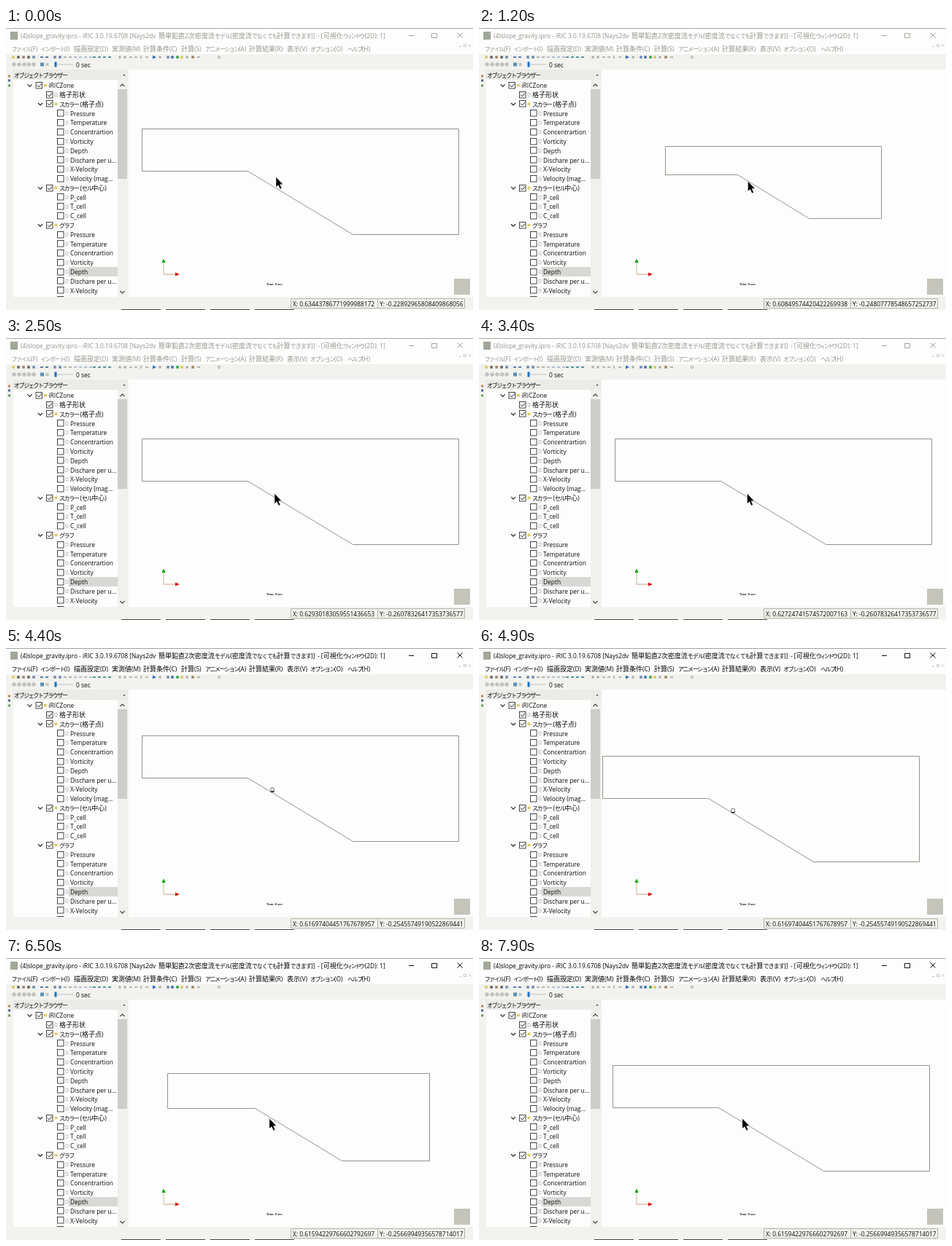
Write an HTML page that moves like this. It is 640 px wide and 387 px high and loops after 8000 ms.

```html
<!DOCTYPE html>
<html lang="ja">
<head>
<meta charset="utf-8">
<title>Slope model viewer</title>
<style>
html, body { margin: 0; width: 100%; height: 100%; overflow: hidden; background: #f2f2ee; }
svg { display: block; width: 100vw; height: 100vh; }
text { font: 8.4px 'Open Sans', 'Noto Sans CJK JP', 'Noto Sans CJK', sans-serif; fill: #0c0c0c; white-space: pre; }
.kanji { font-size: 9px; }
.kana { font-size: 8px; }
.bar text { fill: #95958c; }
.bar path { stroke: #a4a49c; fill: none; }
.active .bar text { fill: #000; }
.active .bar .window { stroke: #111; }
#time { font: bold 4px 'Liberation Sans', sans-serif; }
</style>
</head>
<body>
<svg id="stage" viewBox="0 0 640 387" preserveAspectRatio="none">
  <defs>
    <clipPath id="viewClip"><rect x="168" y="57" width="472" height="312"/></clipPath>
    <clipPath id="treeClip"><rect x="9" y="71" width="144" height="298"/></clipPath>
  </defs>
  <rect width="640" height="387" fill="#f2f2ee"/>
  <rect width="640" height="36" fill="#fdfdfd"/>
  <rect width="640" height="1" fill="#a4a49c"/>
  <path d="M158 386.500H395" stroke="#44443c" stroke-dasharray="54 7"/>
  <g id="bar" class="bar">
    <path class="window" d="M552 10.500h7M583.500 7.500h7v6h-7zM618.500 6.500l7 7M625.500 6.500l-7 7"/>
    <path d="M621 25.500h3M627.500 22.500h3v3h-3zM634 22.500l3 3M637 22.500l-3 3" stroke-width=".6"/>
  </g>
  <rect x="6" y="5" width="10" height="11" fill="#a0a898"/>
  <g id="tools"></g>

  <rect x="9" y="57" width="158" height="14" fill="#ebebe7"/>
  <path d="M160.500 64h3l-1.500 2z" fill="#333"/>
  <rect x="10" y="71" width="143" height="298" fill="#fdfdfd"/>
  <g id="tree" clip-path="url(#treeClip)"></g>
  <rect x="153" y="71" width="13" height="298" fill="#f0f0ec"/>
  <rect x="153" y="84" width="13" height="123" fill="#cdcdca"/>
  <path d="M156.500 80l3-3 3 3M156.500 361l3 3 3-3" stroke="#444" fill="none" stroke-width="1.200"/>

  <rect x="168" y="57" width="472" height="312" fill="#fdfdfd"/>
  <g clip-path="url(#viewClip)">
    <polygon id="outline" fill="none" stroke="#94948a"/>
  </g>
  <path d="M216 338V322" stroke="#b4c088"/>
  <path d="M216 338H232" stroke="#d09a80"/>
  <path d="M216 316.500l2.700 5.500h-5.400z" fill="#10a810"/>
  <path d="M238 338l-6-2.600v5.200z" fill="#d01010"/>
  <text id="time" x="357" y="353">Time: 0 sec</text>
  <rect x="614" y="344" width="22" height="22" fill="#c4c4ba"/>

  <path d="M390.500 371.500H628.500V384.500H390.500zM509.500 371.500v13" stroke="#b4b4ac" fill="none"/>
  <text id="xPos" x="393" y="381.500"></text>
  <text id="yPos" x="512" y="381.500"></text>

  <path id="arrow" d="M0 0V13.800L3.200 11.200 5.600 16.500 7.900 15.500 5.500 10.300 9.600 10z" fill="#000" stroke="#fff" stroke-width=".4"/>
  <g id="hand">
    <path d="M-2.200 2.500V-1Q-2-3 0-3T2.200 -1V2.500z" fill="#fdfdfd" stroke="#333" stroke-width=".7"/>
    <path d="M-1.800 2.700H2.200" stroke="#000" stroke-width="1.400"/>
  </g>
</svg>
<script>
const $ = id => document.getElementById(id);
const NS = 'http://www.w3.org/2000/svg';

function add(parent, tag, attrs, text) {
  const el = document.createElementNS(NS, tag);
  for (const k in attrs) el.setAttribute(k, attrs[k]);
  if (text) el.textContent = text;
  parent.appendChild(el);
  return el;
}

// Mixed-script label: kana are set tighter than kanji.
function label(parent, x, y, str, tight = -1.4) {
  const el = add(parent, 'text', { x, y });
  for (const run of str.match(/[\u3040-\u30ff]+|[\u4e00-\u9fff]+|[^\u3040-\u30ff\u4e00-\u9fff]+/g)) {
    if (/[\u3040-\u30ff]/.test(run)) add(el, 'tspan', { class: 'kana', 'letter-spacing': tight }, run);
    else if (/[\u4e00-\u9fff]/.test(run)) add(el, 'tspan', { class: 'kanji' }, run);
    else add(el, 'tspan', {}, run);
  }
}

// Title and menu
const bar = $('bar');
label(bar, 20, 13.5, '(4)slope_gravity.ipro - iRIC 3.0.19.6708 [Nays2dv');
label(bar, 209, 13.5, '簡単鉛直2次密度流モデル(密度流でなくても計算できます)]', -0.9);
label(bar, 427, 13.5, '- [可視化ウィンドウ (2D): 1]', -2.4);
[[7.5, 'ファイル(F)'], [47, 'インポート(I)'], [93, '描画設定(D)'], [145, '実測値(M)'],
 [188, '計算条件(C)'], [240, '計算(S)'], [273, 'アニメーション(A)'], [333, '計算結果(R)'],
 [385, '表示(V)'], [417, 'オプション(O)'], [468, 'ヘルプ(H)']
].forEach(([x, s]) => label(bar, x, 32, s));

// Toolbars
const tools = $('tools');
function icons(xs, fill, w = 3.5, h = 3.5) {
  xs.forEach(x => add(tools, 'rect', { x: x - w / 2, y: 40 - h / 2, width: w, height: h, fill }));
}
icons([10, 241], '#dcc850');
icons([17, 31], '#606060');
icons([24, 256], '#a08460');
icons([38, 67, 74, 222], '#6c88b0');
icons([49, 56], '#5c7ca8', 4, 2);
icons([81, 88, 264], '#b4b4ac', 4, 2);
icons([95, 102, 109, 116], '#b0c0d0', 4, 2);
icons([121, 128, 135, 142], '#5c94a0', 4, 2);
icons([156, 163, 211, 248], '#a8a8a0', 3, 3);
icons([171, 178, 193], '#808080', 4, 1);
icons([185], '#808080', 1, 4);
icons([228], '#3c6cb8');
icons([235], '#3c9c4c');
add(tools, 'path', { d: 'M201 37.5l5 2.5-5 2.5z', fill: '#2c6cc0' });
const ring = { r: 2.2, fill: 'none', stroke: '#909090', 'stroke-width': 0.8 };
add(tools, 'circle', { cx: 292, cy: 40, ...ring, r: 1.6 });
[11, 18, 25, 31.5, 38].forEach(cx => {
  add(tools, 'circle', { cx, cy: 50, ...ring });
  add(tools, 'circle', { cx, cy: 50, r: 0.8, fill: '#707070' });
});
add(tools, 'rect', { x: 47, y: 47.5, width: 5, height: 5, fill: '#5c90b8' });
add(tools, 'rect', { x: 54.5, y: 48, width: 4, height: 4, fill: '#c4c4bc' });
add(tools, 'rect', { x: 66, y: 49.5, width: 26, height: 1, fill: '#c4c4c0' });
add(tools, 'rect', { x: 66.5, y: 46.5, width: 3, height: 7, fill: '#1874c8' });
label(tools, 96, 53.5, '0 sec');
[[66, '#c08850'], [72, '#506890'], [79, '#60a060']].forEach(([y, fill]) =>
  add(tools, 'rect', { x: 3, y: y - 1.5, width: 3, height: 3, fill }));

// Object browser
label($('tools').parentNode, 11, 67.5, 'オブジェクトブラウザー');
const tree = $('tree');
const vars = ['Pressure', 'Temperature', 'Concentrartion', 'Vorticity', 'Depth',
  'Dischare per u...', 'X-Velocity', 'Velocity (mag...'];
const rows = [[0, 'iRICZone'], [1, '格子形状', 1], [1, 'スカラー (格子点)'], ...vars.map(v => [2, v]),
  [1, 'スカラー (セル中心)'], ...['P_cell', 'T_cell', 'C_cell'].map(v => [2, v]),
  [1, 'グラフ'], ...vars.map(v => [2, v])];
rows.forEach(([level, name, leaf], i) => {
  const y = 78.9 + 12.79 * i;
  const x = [40.5, 55, 70][level];
  const by = Math.round(y - 4) - 0.5;
  const folder = level < 2 && !leaf;
  if (i === 20) add(tree, 'rect', { x: 86, y: 328, width: 67, height: 13, fill: '#d8d8d4' });
  add(tree, 'rect', { x: x + 0.5, y: by, width: 8.5, height: 8.5, fill: '#fff', stroke: '#333', 'stroke-width': 0.9 });
  if (level < 2) add(tree, 'path', { d: `M${x + 2} ${by + 4}l2.3 2.5 4-4.6`, fill: 'none', stroke: '#222' });
  if (folder) {
    add(tree, 'path', { d: `M${x - 11} ${y - 1.5}l3 3 3-3`, fill: 'none', stroke: '#222', 'stroke-width': 1.2 });
    add(tree, 'rect', { x: x + 11.5, y: y - 2, width: 4, height: 3.5, fill: '#e4cc60' });
  } else {
    add(tree, 'rect', { x: x + 12, y: y - 2, width: 3, height: 4, fill: '#fff', stroke: '#a8b0bc', 'stroke-width': 0.7 });
  }
  label(tree, x + 18, y + 3.3, name);
});

// Motion
const LOOP = 8000;
const shape = [[186.5, 138.5], [620.5, 138.5], [620.5, 283.5], [475.5, 283.5], [331, 196.5], [186.5, 196.5]];
const mid = [404, 213];

// Mouse wheel notches: [time, level]
const wheel = [[0, 0], [400, 1], [600, 2], [800, 1], [900, 0], [1000, -1], [1100, -2], [1300, -1],
  [1400, 0], [1500, 1], [1700, 2], [1800, 3], [2000, 2], [2200, 1], [2400, 0], [2700, 1], [2900, 2],
  [3100, 1], [3300, 0], [5900, 1], [6200, 0], [6400, -1], [7300, 0]];

const pointer = [[0, 370, 204.5], [1000, 368.5, 210.3], [2300, 368, 213.5], [3200, 367.5, 213.5], [3600, 365, 213]];

// Pan offsets, one every 100 ms while dragging
const dragStart = 3800, dragEnd = 5600;
const drag = [[0, 0], [-8, 0], [-16, -1], [-6, -1], [12, -3], [6, -12], [0, -18.5], [0, -16], [-1, -8],
  [-4, 2], [-12, 8], [-17, 10], [-8, 4], [6, -5], [14, -9], [6, 2], [-2.8, 8.5]];

const readout = [
  [0, '0.63443786771999988172', '-0.22892965808409868056'],
  [1000, '0.60849574420422269938', '-0.24807778548657252737'],
  [2300, '0.62930183059551436653', '-0.26078326417353736577'],
  [3200, '0.62724741574572007163', '-0.26078326417353736577'],
  [3600, '0.61697404451767678957', '-0.25455749190522869441'],
  [5000, '0.61594229766602792697', '-0.25669949356578714017']];

const at = (list, t) => list.filter(k => k[0] <= t).pop();
const snap = v => Math.floor(v) + 0.5;

function draw(now) {
  const t = Math.floor((now % LOOP) / 100) * 100;
  const step = Math.min(drag.length - 1, Math.max(0, (t - dragStart) / 100));
  const pan = drag[step];
  const scale = 1.21 ** at(wheel, t)[1];
  $('outline').setAttribute('points', shape.map(p =>
    p.map((v, i) => snap(mid[i] + (v + pan[i] - mid[i]) * scale)).join()).join(' '));

  const [, px, py] = at(pointer, t);
  const grabbing = t >= dragStart && t < dragEnd;
  const lift = t >= dragEnd ? 1.3 : 0;
  const place = `translate(${px + pan[0] - lift} ${py + pan[1] - lift})`;
  for (const id of ['arrow', 'hand']) {
    $(id).setAttribute('transform', place);
    $(id).style.display = (id === 'hand') === grabbing ? '' : 'none';
  }

  const [, x, y] = at(readout, t);
  $('xPos').textContent = 'X: ' + x;
  $('yPos').textContent = 'Y: ' + y;
  $('stage').setAttribute('class', t >= dragStart ? 'active' : '');
}

const began = performance.now();
function tick() {
  draw(performance.now() - began);
  requestAnimationFrame(tick);
}
tick();
</script>
</body>
</html>
```
